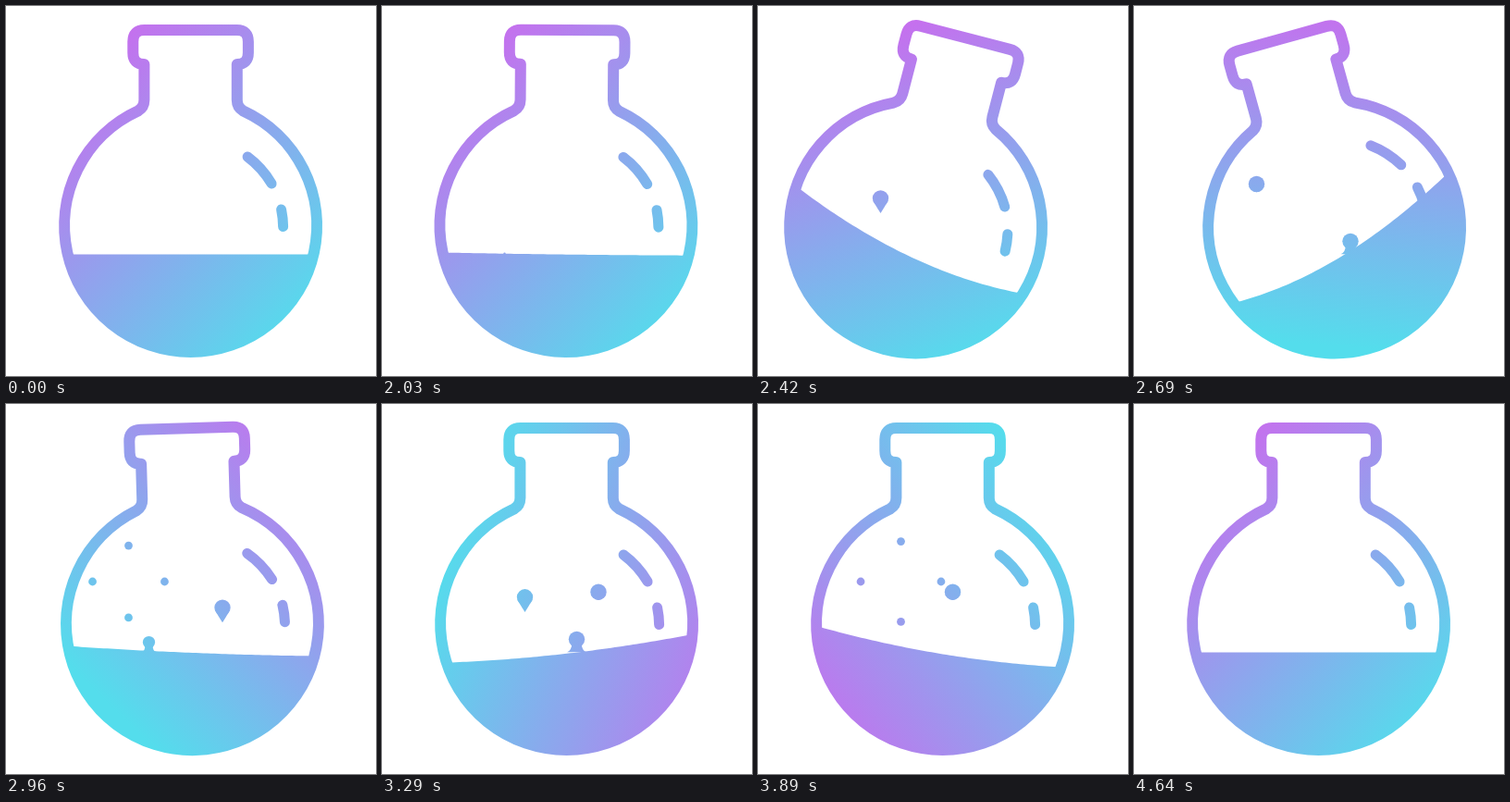
Write an HTML page with a canvas that moves like this. It is 400x400 px and loops after 4.67 s.

```html
<!DOCTYPE html>
<html lang="en">
<head>
<meta charset="utf-8">
<title>Flask</title>
<style>
  html, body { margin: 0; width: 100%; height: 100%; overflow: hidden; background: #fff; }
  canvas { display: block; width: 400px; height: 400px; }
</style>
</head>
<body>
<canvas id="stage" width="400" height="400"></canvas>
<script>
const ctx = document.getElementById('stage').getContext('2d');
const LOOP = 4670, REST = 2030, BEAT = 345;
const RISE = 730, POP = 360, RADIUS = 8.7;

// Extremes reached on successive beats of the shake
const TILT = [0, 18.5, -15.5, 0];
const SHIFT = [0, -35, 17, 0];
const SLOPE = [0, 76, -75, 15, -20, 22, 20, 0];

const BUBBLES = [
  { x: 132.5, birth: 2020, top: 192 },
  { x: 234, birth: 2600, top: 203 },
  { x: 154.5, birth: 2900, top: 192 },
  { x: 210.5, birth: 3200, top: 203 },
];

// Right half of the outline around the centre of the body, then its mirror image
const half = new Path2D('M0-211.5H50Q62.3-211.5 62.3-199V-187Q62.3-174.5 50.2-174.5' +
  'V-136Q50.2-128 57-124A136.5 136.5 0 0 1 0 136.5');
const flask = new Path2D(half);
flask.addPath(half, new DOMMatrix([-1, 0, 0, 1, 0, 0]));
const shine = new Path2D('M61.5-74.5A98.5 98.5 0 0 1 87.5-45.5M98-17.5A98.5 98.5 0 0 1 100 1');

const clamp = v => Math.max(0, Math.min(1, v));
const easeOut = u => 1 - (1 - u) ** 2;
const easeInOut = u => (1 - Math.cos(Math.PI * u)) / 2;

function swing(extremes, t) {
  if (t < REST) return 0;
  const beat = (t - 2000) / BEAT, i = Math.floor(beat);
  const { [i]: from = 0, [i + 1]: to = 0 } = extremes;
  return from + (to - from) * easeInOut(beat - i);
}

function dot(x, y, r) {
  ctx.beginPath();
  ctx.arc(x, y, r, 0, 2 * Math.PI);
  ctx.fill();
}

function drawFlask(cx, cy, tilt) {
  ctx.save();
  ctx.translate(cx, cy);
  ctx.rotate(tilt * Math.PI / 180);
  ctx.lineCap = ctx.lineJoin = 'round';
  ctx.lineWidth = 12;
  ctx.stroke(flask);
  ctx.lineWidth = 11;
  ctx.stroke(shine);
  ctx.restore();
}

function drawLiquid(cx, cy, slope) {
  const level = 268.5 + Math.abs(slope) * .09, bow = Math.abs(slope) * .33;
  ctx.save();
  ctx.beginPath();
  ctx.arc(cx, cy, 137, 0, 2 * Math.PI);
  ctx.clip();
  ctx.beginPath();
  ctx.moveTo(cx - 140, 400);
  for (let dx = -140; dx <= 140; dx += 4) {
    const u = dx / 128;
    ctx.lineTo(cx + dx, level + slope * u - bow * u * u);
  }
  ctx.lineTo(cx + 140, 400);
  ctx.fill();
  ctx.restore();
}

function drawSplash(x, y, u) {
  const distance = 47 * easeOut(u), r = 4.4 * clamp((1 - u) * 6);
  for (let i = 0; i < 4; i++) {
    const a = i * Math.PI / 2;
    dot(x + distance * Math.cos(a), y + distance * Math.sin(a), r);
  }
}

// A shape on the vertical axis through x, narrowing from one width to another
function taper(x, y0, w0, y1, w1, bendY, bendW) {
  ctx.beginPath();
  ctx.moveTo(x - w0, y0);
  ctx.quadraticCurveTo(x - bendW, bendY, x - w1, y1);
  ctx.lineTo(x + w1, y1);
  ctx.quadraticCurveTo(x + bendW, bendY, x + w0, y0);
  ctx.fill();
}

function drawBubble({ x, birth, top }, t) {
  const age = t - birth;
  if (age < 0 || age > RISE + POP) return;
  if (age > RISE) return drawSplash(x, top, (age - RISE) / POP);
  const y = 270 + (top - 270) * easeOut(age / RISE);
  const r = RADIUS * clamp(age / 80);
  dot(x, y, r);
  if (age < 200) {
    // neck still joined to the surface
    taper(x, y + r * 1.6, r * 1.2, y + r * .4, r * .6, y + r * 1.4, r * .6);
  } else {
    // pointed tail that shrinks into the round drop
    const tail = r + 7.5 * clamp((620 - age) / 180);
    taper(x, y + r * .3, r * .95, y + tail, 0, y + r * .9, r * .6);
  }
}

// Colours everything drawn so far with a gradient that turns once per shake
function tint(t) {
  const p = clamp((t - REST) / (LOOP - REST)), u = p ** 1.07;
  const angle = 2 * Math.PI * (u - .09 * Math.sin(2 * Math.PI * u) - .375);
  const lean = 42 * Math.sin(Math.PI * p) ** 2;
  const along = d => [202 + d * Math.cos(angle), 202 + d * Math.sin(angle)];
  const gradient = ctx.createLinearGradient(...along(lean + 185), ...along(lean - 185));
  gradient.addColorStop(0, '#c86dee');
  gradient.addColorStop(1, '#54ddec');
  ctx.globalCompositeOperation = 'source-in';
  ctx.fillStyle = gradient;
  ctx.fillRect(0, 0, 400, 400);
  ctx.globalCompositeOperation = 'source-over';
}

function frame() {
  const t = performance.now() % LOOP;
  const tilt = swing(TILT, t);
  const cx = 199.6 + swing(SHIFT, t), cy = 237.5 + Math.abs(tilt) * .1;
  ctx.clearRect(0, 0, 400, 400);
  ctx.fillStyle = ctx.strokeStyle = '#000';
  drawFlask(cx, cy, tilt);
  drawLiquid(cx, cy, swing(SLOPE, t));
  BUBBLES.forEach(bubble => drawBubble(bubble, t));
  tint(t);
  requestAnimationFrame(frame);
}
frame();
</script>
</body>
</html>
```
